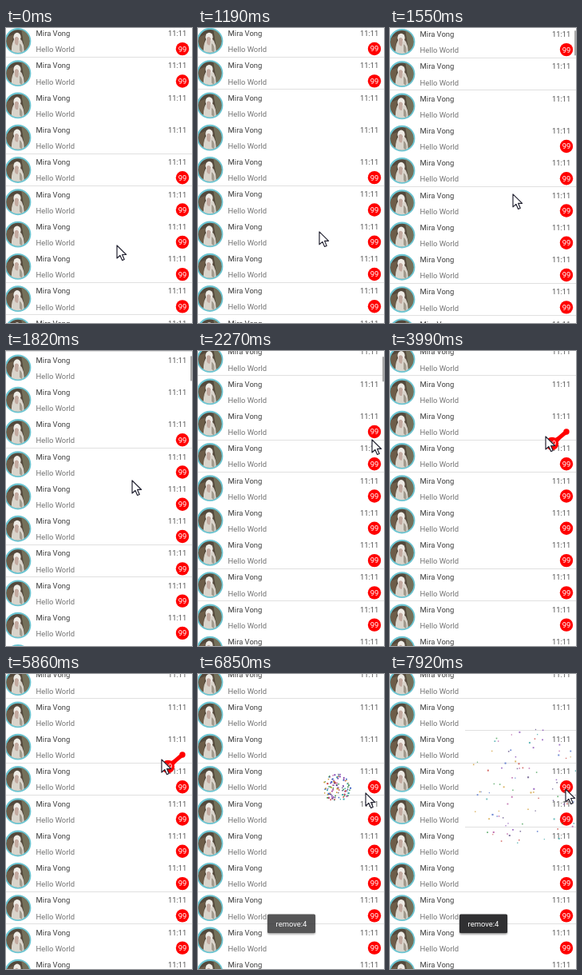
Recreate the animation shown at these times as an HTML page. Size 233 by 369 pixels, loop 8 s.

```html
<!DOCTYPE html>
<html lang="en">
<head>
<meta charset="utf-8">
<title>Badge drag demo</title>
<style>
  html, body { margin: 0; width: 100%; height: 100%; overflow: hidden; background: #fff; }
  svg { display: block; width: 233px; height: 369px; font: 9.45px Roboto, "Open Sans", sans-serif; }
  .name { fill: #3f3f3f; }
  .note { fill: #747474; }
  .time { fill: #555; font-size: 9.3px; }
  .count { fill: #fff; text-anchor: middle; }
  .divider { fill: #e0e0e0; }
</style>
</head>
<body>
<svg viewBox="0 0 233 369">
  <defs>
    <clipPath id="round"><circle r="14.6"/></clipPath>
    <filter id="soft" x="-10%" y="-20%" width="120%" height="150%"><feGaussianBlur stdDeviation="1.2"/></filter>
    <g id="avatar">
      <circle r="15.3" fill="#54493c" stroke="#6cc5d2" stroke-width="2.2"/>
      <g clip-path="url(#round)">
        <path d="M4-16H16V16H9Z" fill="#74705a"/>
        <path d="M-16-4L-6-8L-9 16H-16Z" fill="#6d5d49"/>
        <path d="M-8 16Q-9 3-4-3Q1-6 5 0Q9 8 7 16Z" fill="#d9d4cb"/>
        <ellipse cx="-1" cy="-5" rx="4.6" ry="5.6" fill="#eeebe5"/>
        <path d="M-4-4Q-1-7 1-3L0 5Q-3 6-4 2Z" fill="#c3aaa0"/>
        <path d="M2 3Q7 6 5 15L2 12Z" fill="#a29b8e"/>
      </g>
    </g>
    <g id="badge">
      <circle r="8.2" fill="#f00"/>
      <text class="count" y="3.4">99</text>
    </g>
    <g id="row">
      <use href="#avatar" x="15" y="0.3"/>
      <text class="name" x="37.6" y="-5.9">Mira Vong</text>
      <text class="note" x="37.6" y="14.3">Hello World</text>
      <text class="time" x="203" y="-5.9">11:11</text>
    </g>
  </defs>
  <rect width="233" height="369" fill="#fff"/>
  <g id="lines"></g>
  <g id="list"></g>
  <rect id="bar" x="231" width="2" height="31" fill="#a8a8a8"/>
  <g id="toast">
    <rect x="87" y="301.5" width="60" height="24" rx="2" fill="#000" opacity=".45" filter="url(#soft)"/>
    <rect x="87" y="300.5" width="60" height="23.5" rx="1.5" fill="#303032"/>
    <text class="count" x="117" y="315.6">remove:4</text>
  </g>
  <g id="sparks"></g>
  <g id="pull">
    <path id="band" fill="#f00"/>
    <circle id="anchor" r="3.7" fill="#f00"/>
    <use id="held" href="#badge"/>
  </g>
  <path id="cursor" d="M0 0V16L3.9 12.5L6.6 18.6L9.2 17.5L6.6 11.5H11.6Z" fill="#fff" stroke="#242433" stroke-width="1.2" stroke-linejoin="round"/>
</svg>
<script>
const LOOP = 8000, PITCH = 40.28, FIRST = 16.06, ROWS = 13, PULLED = 4;
const GRAB = 3360, SNAP = 6100, BURST = 6490;
const HOME = [221, 101], BLAST = [174, 142];

// Keys are [time, value, ...]; values move linearly between them.
const cursorKeys = [
  [470, 139, 272], [560, 135, 275], [740, 164, 268], [920, 152, 255], [1190, 152, 255],
  [1550, 154, 208], [1820, 158, 162], [1910, 160, 158], [2270, 218, 111], [2630, 221, 98],
  [2720, 221, 98], [2990, 219, 96], [3360, 219, 96], [3990, 195, 107], [5860, 195, 107],
  [6310, 174, 126], [6490, 170, 132], [6850, 210, 149], [7210, 219, 147], [7920, 220, 144]
];
const scrollKeys = [[1190, 0], [1550, 39.2], [1820, 76], [2000, 86.32]];
const barKeys = [[1190, 0], [1350, 1], [2360, 1], [2630, 0]];
const heldKeys = [[GRAB, ...HOME], [3990, 203, 116], [5860, 203, 116], [6310, 181, 136], [BURST, ...BLAST]];
const toastKeys = [[6580, 0], [6850, .82], [7030, 1]];
const spreadKeys = [[BURST, 6], [6850, 17.5], [7210, 36], [7920, 77]];

const $ = id => document.getElementById(id);

function add(parent, tag, attrs) {
  const el = document.createElementNS("http://www.w3.org/2000/svg", tag);
  set(el, attrs);
  return parent.appendChild(el);
}

function set(el, attrs) {
  for (const k in attrs) el.setAttribute(k, attrs[k]);
}

function show(el, on) {
  el.style.display = on ? "" : "none";
}

function move(el, x, y) {
  el.setAttribute("transform", `translate(${x} ${y})`);
}

function at(keys, t) {
  const i = keys.findIndex(k => k[0] > t);
  if (i === 0) return keys[0].slice(1);
  if (i < 0) return keys[keys.length - 1].slice(1);
  const a = keys[i - 1], b = keys[i], p = (t - a[0]) / (b[0] - a[0]);
  return a.slice(1).map((v, n) => v + (b[n + 1] - v) * p);
}

function randomizer(seed) {
  return () => (seed = seed * 16807 % 2147483647) / 2147483647;
}

const lines = [], badges = [];
for (let i = 0; i < ROWS; i++) {
  const y = FIRST + i * PITCH;
  lines.push(add($("lines"), "rect", { class: "divider", height: 1 }));
  add($("list"), "use", { href: "#row", y });
  if (i !== 2 && i !== 3) badges[i] = add($("list"), "use", { href: "#badge", x: 221, y: y + 10.1 });
}

const rnd = randomizer(4127);
const colors = ["#3c9a4c", "#7d3fb0", "#c8413c", "#3f62c4", "#cf9a2e", "#3aa6a6", "#b04a9a", "#5a4a80"];
const sparks = Array.from({ length: 105 }, (_, i) => ({
  angle: rnd() * Math.PI * 2,
  reach: Math.sqrt(rnd()),
  size: 1.2 + rnd() * .9,
  el: add($("sparks"), "rect", { fill: colors[i % colors.length] })
}));

function drawList(t) {
  const [scroll] = at(scrollKeys, t);
  move($("list"), 0, -scroll);
  // A hairline shows only where it lands on a pixel row.
  lines.forEach((line, i) => {
    const y = FIRST + (i + .5) * PITCH - scroll;
    const sharp = y - Math.floor(y) < .45;
    const redrawn = t >= 7300 && y > 67 && y < 216;
    const x = sharp ? 0 : 94;
    set(line, { x, y: Math.floor(y), width: 233 - x });
    show(line, sharp || redrawn);
  });
  set($("bar"), { y: scroll * 31 / 369, opacity: at(barKeys, t)[0] });
  show(badges[PULLED], t < GRAB);
}

function drawPull(t) {
  show($("pull"), t >= GRAB && t < BURST);
  const [x, y] = at(heldKeys, t), [ax, ay] = HOME;
  const len = Math.hypot(x - ax, y - ay) || 1;
  const nx = (ay - y) / len, ny = (x - ax) / len;
  const mx = (x + ax) / 2, my = (y + ay) / 2;
  set($("band"), {
    d: `M${ax + nx * 2.6} ${ay + ny * 2.6}Q${mx + nx * 1.6} ${my + ny * 1.6} ${x + nx * 4} ${y + ny * 4}` +
       `L${x - nx * 4} ${y - ny * 4}Q${mx - nx * 1.6} ${my - ny * 1.6} ${ax - nx * 2.6} ${ay - ny * 2.6}Z`
  });
  move($("anchor"), ax, ay);
  move($("held"), x, y);
  show($("band"), t < SNAP);
  show($("anchor"), t < SNAP);
}

function drawBurst(t) {
  show($("sparks"), t >= BURST);
  const [spread] = at(spreadKeys, t);
  const fade = 1 - Math.max(0, t - 6850) / 4200;
  for (const s of sparks) {
    const d = spread * s.reach;
    set(s.el, {
      x: BLAST[0] + Math.cos(s.angle) * d - s.size / 2,
      y: BLAST[1] + Math.sin(s.angle) * d - s.size / 2,
      width: s.size, height: s.size, opacity: fade
    });
  }
  set($("toast"), { opacity: at(toastKeys, t)[0] });
}

function draw(t) {
  drawList(t);
  drawPull(t);
  drawBurst(t);
  move($("cursor"), ...at(cursorKeys, t));
}

const start = performance.now();
function tick() {
  draw((performance.now() - start) % LOOP);
  requestAnimationFrame(tick);
}
tick();
</script>
</body>
</html>
```
